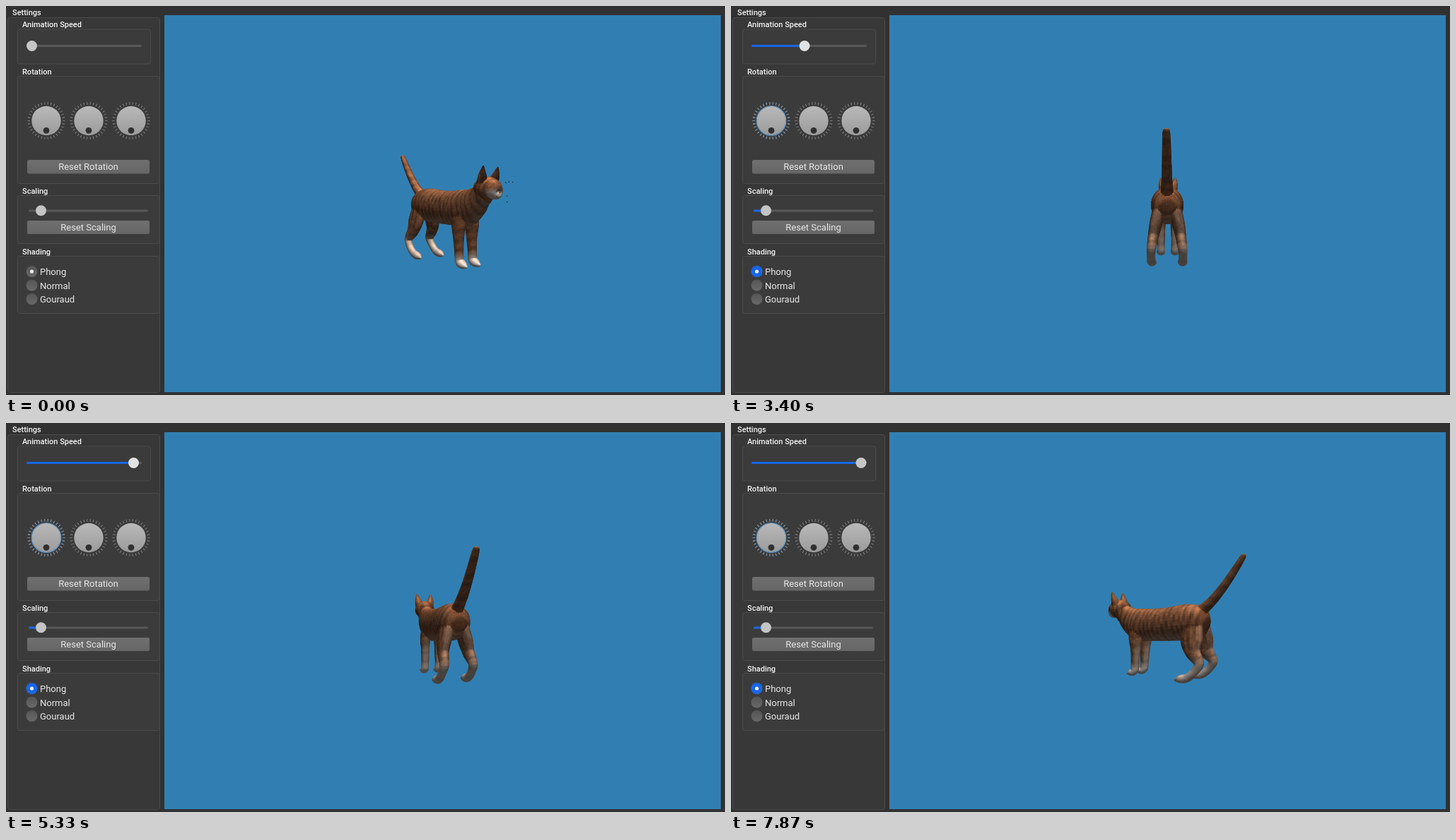
Animation, 1017 px wide and 551 px high, one loop 7940 ms. Source, as an HTML page with a canvas:

```html
<!DOCTYPE html>
<html lang="en">
<head>
<meta charset="utf-8">
<title>Model viewer</title>
<style>
html, body { margin: 0; width: 100%; height: 100%; overflow: hidden; background: #313131; }
svg, canvas { position: absolute; left: 0; top: 0; }
canvas { left: 224px; top: 13px; }
text { font: 13px Roboto, sans-serif; fill: #e8e8e8; }
.title { font-size: 11px; font-weight: 500; fill: #f4f4f4; }
.box { fill: #3b3b3b; stroke: #4b4b4b; }
.track { fill: #595959; }
.button { fill: url(#buttonFill); }
.radio { fill: url(#radioFill); }
.lit { fill: #1766e8; }
</style>
</head>
<body>
<svg width="1017" height="551">
  <defs>
    <linearGradient id="knobFill" x2="0" y2="1"><stop stop-color="#b9b9b9"/><stop offset="1" stop-color="#9b9b9b"/></linearGradient>
    <linearGradient id="buttonFill" x2="0" y2="1"><stop stop-color="#6f6f6f"/><stop offset="1" stop-color="#666"/></linearGradient>
    <linearGradient id="radioFill" x2="0" y2="1"><stop stop-color="#555"/><stop offset="1" stop-color="#696969"/></linearGradient>
    <circle id="ticks" r="24.7" fill="none" stroke-width="3.6" pathLength="34" stroke-dasharray=".18 .82" stroke-dashoffset=".09"/>
    <g id="dial">
      <use href="#ticks" stroke="#929292"/>
      <circle r="20.7" fill="url(#knobFill)"/>
      <circle cy="13.8" r="4.4" fill="#303030"/>
    </g>
  </defs>
  <g class="box">
    <rect x="2.5" y="16.5" width="215" height="531" rx="3" style="fill:#383838"/>
    <rect x="16.5" y="33" width="188" height="49" rx="3"/>
    <rect x="16.5" y="99.5" width="200.5" height="152" rx="3"/>
    <rect x="16.5" y="268.5" width="200.5" height="68" rx="3"/>
    <rect x="16.5" y="354.5" width="200.5" height="81" rx="3"/>
  </g>
  <text class="title" x="9" y="13">Settings</text>
  <text class="title" x="23" y="30">Animation Speed</text>
  <text class="title" x="23" y="96.5">Rotation</text>
  <text class="title" x="23" y="265.5">Scaling</text>
  <text class="title" x="23" y="351.5">Shading</text>

  <rect class="track" x="29" y="55" width="163" height="3" rx="1.5"/>
  <rect id="speedFill" class="lit" x="29" y="55" height="3" rx="1.5"/>
  <circle id="speedKnob" cy="56.5" r="7.5"/>

  <use href="#dial" x="57" y="162.5"/>
  <use href="#dial" x="117" y="162.5"/>
  <use href="#dial" x="177" y="162.5"/>
  <g id="focus">
    <circle cx="57" cy="162.5" r="20.9" fill="none" stroke="#5b8fbe" stroke-width="1.2"/>
    <use href="#ticks" x="57" y="162.5" stroke="#7f9db8"/>
  </g>

  <rect class="button" x="30" y="218" width="173" height="19.5" rx="2.5"/>
  <text x="116.5" y="232" text-anchor="middle">Reset Rotation</text>
  <rect class="track" x="32" y="288.5" width="169" height="3" rx="1.5"/>
  <rect id="scaleFill" class="lit" x="32" y="288.5" width="17" height="3" rx="1.5"/>
  <circle cx="49.5" cy="289.8" r="7.5" fill="#c4c4c4"/>
  <rect class="button" x="30" y="304" width="173" height="19" rx="2.5"/>
  <text x="116.5" y="318" text-anchor="middle">Reset Scaling</text>

  <circle class="radio" cx="36.5" cy="376" r="8"/>
  <circle id="radioOn" class="lit" cx="36.5" cy="376" r="8"/>
  <circle cx="36.5" cy="376" r="2.6" fill="#f2f2f2"/>
  <circle class="radio" cx="36.5" cy="395.5" r="8"/>
  <circle class="radio" cx="36.5" cy="415" r="8"/>
  <text x="48" y="381">Phong</text>
  <text x="48" y="400.5">Normal</text>
  <text x="48" y="420">Gouraud</text>
</svg>
<canvas id="view" width="787" height="534"></canvas>
<script>
const $ = id => document.getElementById(id);
const ctx = $('view').getContext('2d');
const LOOP = 7940, SLOWEST = 36.5, EYE = 480;

// time, slider position, heading in degrees
const KEYS = [
  [0, 36.5, 54], [600, 36.5, 54], [1470, 50.5, 42], [2800, 78, -20.5], [4000, 130, -191],
  [4800, 137, -339], [5330, 180.5, -468], [6330, 184, -776], [LOOP, 184, -1246]
];

const ramp = (a, b, x) => Math.min(1, Math.max(0, (x - a) / (b - a)));
const mix = (a, b, k) => a + (b - a) * k;
let seed = 7;
const random = () => (seed = seed * 16807 % 2147483647) / 2147483647;

// The model: x forward, y up, z sideways
const faces = [];

function spline(pts, t) {
  const f = t * (pts.length - 1), i = Math.min(pts.length - 2, Math.floor(f)), k = f - i;
  const p = j => pts[Math.min(pts.length - 1, Math.max(0, i + j))];
  return p(0).map((b, n) => {
    const a = p(-1)[n], c = p(1)[n], d = p(2)[n];
    return b + k / 2 * (c - a + k * (2 * a - 5 * b + 4 * c - d + k * (3 * (b - c) + d - a)));
  });
}

function paint(part, [x, y, z], n) {
  const bands = Math.sin(x * .75 + 1.5 * Math.sin(y * .13) + Math.sin(x * .21 + z * .05));
  const rings = Math.sin(y * .5 + Math.sin(x * .3));
  const band = part === 'body' || part === 'head' ? bands
    : part === 'hind' ? mix(rings, bands, ramp(-45, -25, y)) : rings * .5;
  let shade = (.88 + .24 * random()) * (1 - .28 * ramp(-.3, .9, band)), white = 0;
  if (part === 'body') white = .4 * ramp(-.3, -.9, n[1]);
  if (part === 'head') white = ramp(97, 103, x) * ramp(18, 13, y);
  if (part === 'hind') white = Math.max(.85 * ramp(-42, -62, y), .3 * ramp(0, -.9, n[0]));
  if (part === 'front') white = Math.max(ramp(-60, -73, y), .6 * ramp(0, -.7, n[0]) * ramp(-22, -45, y));
  if (part === 'ear' && n[0] > .3) shade *= .55;
  return [150, 95, 63].map((c, i) => mix(c * shade, [222, 208, 198][i] * (.85 + .15 * shade), white));
}

// Points hold x, y, z and the two radii of an elliptic ring
function tube(part, pts, rings, sides) {
  const grid = [];
  for (let i = 0; i <= rings; i++) {
    const t = i / rings, c = spline(pts, t);
    const a = spline(pts, Math.max(0, t - .01)), b = spline(pts, Math.min(1, t + .01));
    const dx = b[0] - a[0], dy = b[1] - a[1], len = Math.hypot(dx, dy) || 1;
    const r = Math.max(.3, c[3]), rz = Math.max(.3, c[4]);
    grid.push(Array.from({ length: sides }, (_, j) => {
      const q = j / sides * 2 * Math.PI, h = r * Math.cos(q);
      return [c[0] - dy / len * h, c[1] + dx / len * h, c[2] + rz * Math.sin(q)];
    }));
  }
  for (let i = 0; i < rings; i++) for (let j = 0; j < sides; j++) {
    const k = (j + 1) % sides;
    const pts = [grid[i][j], grid[i][k], grid[i + 1][k], grid[i + 1][j]];
    const mid = [0, 1, 2].map(m => pts.reduce((s, p) => s + p[m], 0) / 4);
    const e = pts[2].map((v, m) => v - pts[0][m]), g = pts[3].map((v, m) => v - pts[1][m]);
    let n = [e[1] * g[2] - e[2] * g[1], e[2] * g[0] - e[0] * g[2], e[0] * g[1] - e[1] * g[0]];
    const len = Math.hypot(...n) || 1;
    n = n.map(v => v / len);
    faces.push({ pts, mid, n, rgb: paint(part, mid, n) });
  }
}

tube('body', [[-64, -1, 0, 1, 1], [-62, -1, 0, 11, 11], [-55, -1, 0, 20, 18], [-32, -2, 0, 24, 21], [0, -5, 0, 23, 20],
  [30, -6, 0, 23, 19], [50, -6, 0, 24, 18], [66, 0, 0, 20, 16], [78, 8, 0, 15, 13], [87, 14, 0, 12, 11], [90, 15, 0, 1, 1]], 76, 40);
tube('head', [[75, 16, 0, 2, 2], [79, 17, 0, 11, 11], [89, 18, 0, 14, 15], [98, 17, 0, 13, 14],
  [104, 14, 0, 10, 10.5], [109, 11, 0, 6, 6.5], [111, 11, 0, 1, 1]], 28, 28);
tube('tail', [[-52, 11, 0, 7.5, 8], [-70, 25, 0, 6, 6.5], [-87, 43, 0, 5, 5.5], [-101, 61, 0, 4.2, 4.8],
  [-113, 78, 0, 3, 3.6], [-115, 81, 0, .5, .5]], 54, 14);
for (const s of [-1, 1]) {
  tube('ear', [[91, 23, 8 * s, 7, 7], [94, 34, 10.5 * s, 4.3, 4.8], [97, 44, 12 * s, .4, .4]], 10, 12);
  tube('hind', [[-47, -1, 9 * s, 13, 8], [-48, -24, 14 * s, 16, 8], [-52, -40, 17 * s, 11, 6.5], [-62, -54, 19 * s, 6.2, 5.5],
    [-56, -65, 20 * s, 5, 4.8], [-45, -74, 20 * s, 5, 5], [-34, -76.5, 20 * s, 4.6, 5.5], [-26, -78.5, 20 * s, 1, 1]], 48, 22);
  tube('front', [[50, -12, 9 * s, 13, 7], [50, -28, 11 * s, 11, 7], [50, -45, 11 * s, 7.5, 6], [51, -62, 11 * s, 6, 5.3],
    [52, -73, 11 * s, 5.5, 5.5], [58, -77, 11 * s, 4.6, 5.8], [66, -79, 11 * s, 1, 1]], 42, 18);
}
// x, y, z, size, colour
const spots = [
  [105.5, 19, 8, 3, '#1f1a12'], [105.5, 19, -8, 3, '#1f1a12'], [112, 13, 0, 3, '#70473b'],
  [110, 8, 3, 1.4, '#35241c'], [110, 8, -3, 1.4, '#35241c']
];
const whiskers = [[107, 26, 20], [107, 26, 27], [107, 25, 15], [106, 9, 18], [107, 2, 17]];

function drawCat(deg) {
  const c = Math.cos(deg * Math.PI / 180), s = Math.sin(deg * Math.PI / 180);
  const turn = ([x, y, z]) => [x * c + z * s, y, x * s - z * c];
  const project = p => {
    const [x, y, z] = turn(p), k = EYE / (EYE - z);
    return [393.5 + x * k, 267 - y * k];
  };
  const items = [];
  for (const f of faces) {
    const m = turn(f.mid), n = turn(f.n);
    if (n[2] * (EYE - m[2]) - n[0] * m[0] - n[1] * m[1] <= 0) continue;
    const light = .34 + .66 * Math.max(0, n[1] * .82 + n[2] * .5 + n[0] * .1);
    const gloss = Math.max(0, n[1] * .8 + n[2] * .6) ** 8;
    const rgb = f.rgb.map((v, i) => Math.round(v * light + gloss * [72, 46, 30][i]));
    items.push({ z: m[2], pts: f.pts, fill: `rgb(${rgb})` });
  }
  const dots = spots.concat(s > .3 ? whiskers.map(w => [...w, 1.3, '#161616']) : []);
  for (const [x, y, z, size, fill] of dots) items.push({ z: turn([x, y, z])[2] + 1, at: [x, y, z], size, fill });
  items.sort((a, b) => a.z - b.z);

  ctx.fillStyle = '#317fb2';
  ctx.fillRect(0, 0, 787, 534);
  ctx.lineWidth = .6;
  for (const f of items) {
    ctx.fillStyle = ctx.strokeStyle = f.fill;
    if (f.at) {
      const [x, y] = project(f.at);
      ctx.fillRect(x - f.size / 2, y - f.size / 2, f.size, f.size);
      continue;
    }
    ctx.beginPath();
    f.pts.forEach(p => ctx.lineTo(...project(p)));
    ctx.closePath();
    ctx.fill();
    ctx.stroke();
  }
}

// Turning speed follows the slider
function pose(t) {
  const i = KEYS.findIndex((k, n) => n && t <= k[0]);
  const [t0, p0, a0] = KEYS[i - 1], [t1, p1, a1] = KEYS[i];
  const u = (t - t0) / (t1 - t0), v0 = p0 - SLOWEST, v1 = p1 - SLOWEST;
  const part = (2 * v0 * u + (v1 - v0) * u * u) / (v0 + v1 || 1);
  return { slider: mix(p0, p1, u), angle: mix(a0, a1, part) };
}

let last = -1;
function tick(now) {
  const step = Math.floor(now % LOOP * .015 + .06);
  if (step !== last) {
    last = step;
    const t = Math.min(LOOP, step / .015), { slider, angle } = pose(t);
    const active = Math.min(1, step / 4);
    for (const id of ['speedFill', 'scaleFill', 'radioOn', 'focus']) $(id).style.opacity = active;
    $('speedFill').setAttribute('width', slider - 29);
    $('speedKnob').setAttribute('cx', slider);
    $('speedKnob').setAttribute('fill', t >= 600 && t < 5800 ? '#e2e2e2' : '#c6c6c6');
    drawCat(angle);
  }
  requestAnimationFrame(tick);
}
requestAnimationFrame(tick);
</script>
</body>
</html>
```
